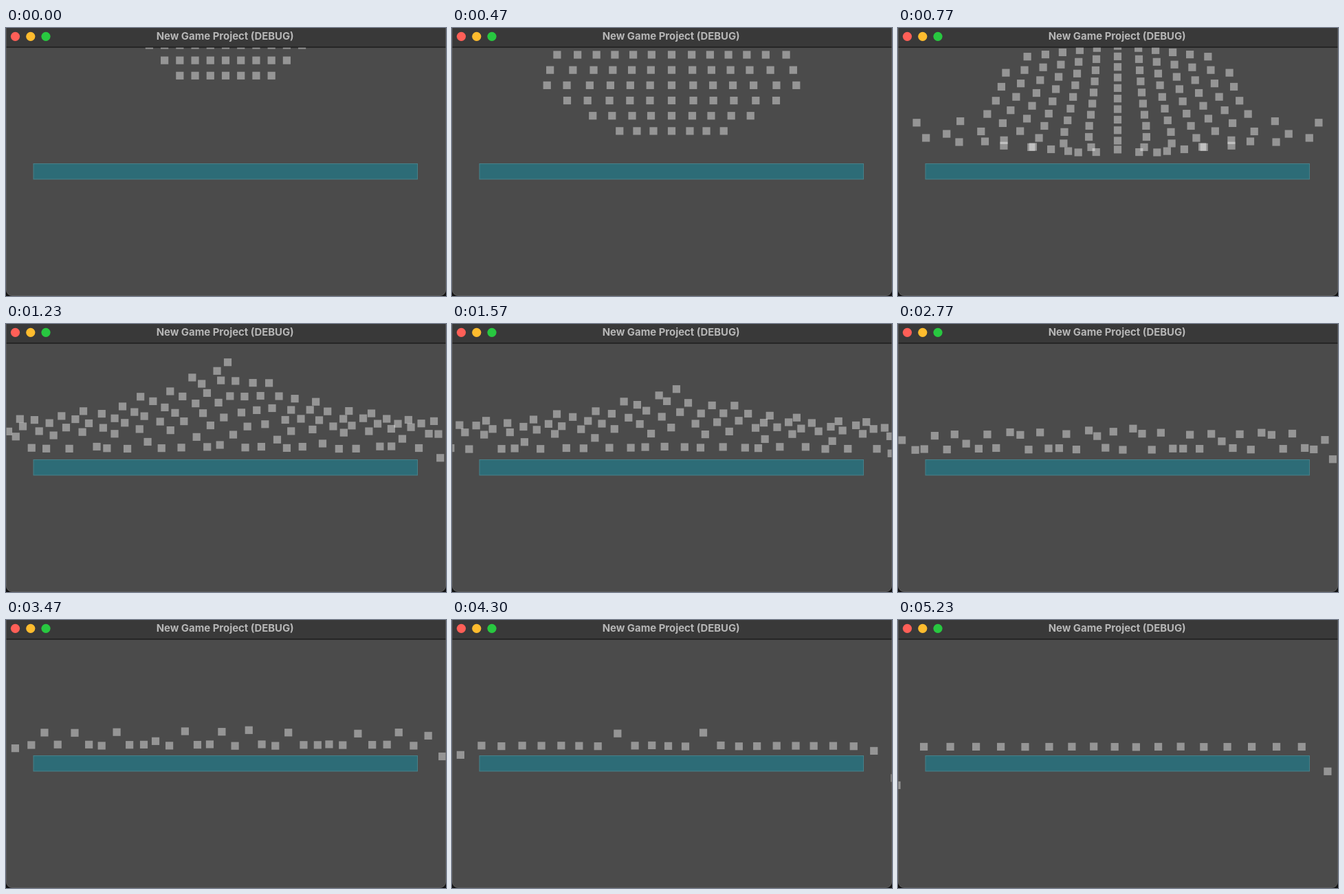
An HTML page that plays this animation: 640 by 390 pixels, repeating every 5270 ms.

```html
<!DOCTYPE html>
<html lang="en">
<head>
<meta charset="utf-8">
<title>Falling particles</title>
<style>
  html, body { margin: 0; width: 100%; height: 100%; overflow: hidden; background: #111; }
  svg { display: block; width: 640px; height: 390px; }
  text { font: 700 14.9px Inter, "Liberation Sans", sans-serif; fill: #b6b6b6; }
</style>
</head>
<body>
<svg viewBox="0 0 640 390">
  <defs>
    <clipPath id="window"><path d="M0 0H640V381a9 9 0 0 1 -9 9H9a9 9 0 0 1 -9 -9Z"/></clipPath>
    <clipPath id="view"><rect y="28.5" width="640" height="361.5"/></clipPath>
  </defs>
  <g clip-path="url(#window)">
    <rect width="640" height="390" fill="#4b4b4b"/>
    <rect width="640" height="28" fill="#393939"/>
    <rect y="27.5" width="640" height="1" fill="#0c0c0c"/>
    <circle cx="13.5" cy="12.3" r="6.6" fill="#ff5f57"/>
    <circle cx="35.8" cy="12.3" r="6.6" fill="#febc2e"/>
    <circle cx="58" cy="12.3" r="6.6" fill="#28c840"/>
    <text x="318.7" y="17.2" text-anchor="middle">New Game Project (DEBUG)</text>
    <rect x="40" y="197.5" width="558.5" height="22.5" fill="#2d6c77" stroke="#47818a"/>
    <g id="particles" clip-path="url(#view)" fill="#fff" fill-opacity=".41"></g>
  </g>
  <path d="M.5 0V381a8.5 8.5 0 0 0 8.5 8.5H631a8.5 8.5 0 0 0 8.5 -8.5V0" fill="none" stroke="#666" stroke-opacity=".6"/>
</svg>
<script>
const LOOP = 5.27, IMPACT = 0.77, SETTLE = 0.46;
const CELL = 22.22, SIZE = 11.2, CENTER = 319.5, GRAVITY = 545;
const layer = document.getElementById("particles");

const clamp = v => Math.max(0, Math.min(1, v));
const smooth = v => (v = clamp(v), v * v * (3 - 2 * v));
const mix = (a, b, u) => a + (b - a) * u;
const noise = n => { const v = Math.sin(n * 127.1 + 3.7) * 43758.5453; return v - Math.floor(v) - 0.5; };
const freeFall = (row, t) => -64 + row * CELL + 46 * t + GRAVITY / 2 * t * t;

// time, spacing, widening, pile height in the middle, at the sides, floor row
const keys = [
  [0.77, 2.9, 0.035, 150, 48, 180],
  [1.23, 4.1, 0.031, 132, 45, 180],
  [1.93, 8.2, 0.023, 55, 32, 180.5],
  [2.77, 13.5, 0.047, 32, 22, 181.5],
  [3.47, 19, 0.06, 24, 17, 182],
  [5.23, 30.8, 0.42, 20, 15, 184.5]
];

// Cubic interpolation through the keys
function pileAt(t) {
  const last = keys.length - 1;
  let j = 0;
  while (j < last - 1 && keys[j + 1][0] <= t) j++;
  const slope = (m, n) => {
    const a = keys[Math.max(0, m - 1)], b = keys[Math.min(last, m + 1)];
    return (b[n] - a[n]) / (b[0] - a[0]);
  };
  const p = keys[j], q = keys[j + 1], h = q[0] - p[0], u = (t - p[0]) / h;
  const w = u * u * (3 - 2 * u);
  const [, spacing, widening, middle, sides, floor] = p.map((v, n) =>
    mix(v, q[n], w) + h * u * (1 - u) * (slope(j, n) * (1 - u) - slope(j + 1, n) * u));
  return { spacing, widening, middle, sides, floor };
}

// Where a cell of the disc is squashed or thrown to on impact
function impact(row, col) {
  const side = Math.abs(col), depth = row + 4;
  const bottomRow = Math.min(6, 9 - side);
  const gap = 26.3 + 0.7 * depth + 0.13 * depth ** 2 - 2.1 * Math.max(0, row - 3) ** 2;
  const burst = 21.5 * Math.max(0, side - 2) * Math.exp(-(((bottomRow - row - 0.8) / 1.2) ** 2));
  const y = 88 + 6.6 * side + (15.2 + 0.85 * side) * row;
  const resting = 181 - 5 * Math.log(1 + Math.exp((181 - y) / 5));
  return {
    spread: col * gap + Math.sign(col) * Math.max(0, 4 - side) * 1.3,
    thrown: Math.sign(col) * burst,
    hitY: resting - burst * 0.35
  };
}

function makeParticles() {
  const list = [];
  for (let row = -6; row <= 6; row++) for (let col = -6; col <= 6; col++) {
    if (col * col + row * row < 49) list.push({ row, col, ...impact(row, col) });
  }
  list.sort((a, b) => a.spread + a.thrown - b.spread - b.thrown);

  // Interleave high and low particles inside each group of neighbours
  const groups = new Map();
  list.forEach((p, n) => {
    const g = Math.floor((n - 66) / 13);
    if (!groups.has(g)) groups.set(g, []);
    groups.get(g).push(p);
  });
  const ordered = [];
  for (const group of groups.values()) {
    group.sort((a, b) => b.hitY - a.hitY);
    group.forEach((_, k) => {
      const order = group.length === 13 ? k * 8 % 13 : 0;
      group[order].level = (order + 0.5) / 13;
      ordered.push(group[order]);
    });
  }
  ordered.forEach((p, n) => {
    p.rank = n - 72;
    p.node = document.createElementNS("http://www.w3.org/2000/svg", "rect");
    p.node.setAttribute("width", SIZE);
    p.node.setAttribute("height", SIZE);
    layer.append(p.node);
  });
  return ordered;
}

function falling(p, t) {
  const u = t / IMPACT;
  const squash = (freeFall(p.row, IMPACT) - p.hitY) * clamp((t - 0.45) / (IMPACT - 0.45)) ** 2;
  return {
    x: CENTER + mix(p.col * CELL, p.spread, u ** 1.5) + p.thrown * u ** 5,
    y: Math.min(181, freeFall(p.row, t) - squash)
  };
}

function offsetInPile(p, pile) {
  const skew = p.rank < 0 ? 1.27 : 1;
  return p.rank * (pile.spacing + pile.widening * skew * Math.abs(p.rank));
}

function spreading(p, t, pile, earlier) {
  const offset = offsetInPile(p, pile), reach = Math.abs(offset);
  const local = pile.spacing + 2 * pile.widening * Math.abs(p.rank);
  const onFloor = local / 30;
  const lift = (p.level - onFloor) / Math.max(0.05, 1 - onFloor);
  const top = mix(pile.sides, pile.middle, clamp(1 - reach / 320) ** 2.4);
  const loose = clamp(1.25 - onFloor);
  const height = 18 * smooth(lift * 6 + 0.35) + (top - 18) * Math.max(0, lift);

  // Past the end of the platform gravity takes over
  const speed = Math.max(40, (reach - Math.abs(offsetInPile(p, earlier))) / 0.05);
  const drop = GRAVITY / 2 * (Math.max(0, reach - 281) / speed) ** 2;
  return {
    x: 316 + offset + noise(p.rank + 200) * 8 * loose,
    y: pile.floor - height + noise(p.rank + 500) * 4 * loose + drop
  };
}

const particles = makeParticles();

function draw(t) {
  const landed = t > IMPACT;
  const pile = landed && pileAt(t), earlier = landed && pileAt(t - 0.05);
  const blend = 1 - (1 - clamp((t - IMPACT) / SETTLE)) ** 2;
  for (const p of particles) {
    let { x, y } = falling(p, Math.min(t, IMPACT));
    if (landed) {
      const s = spreading(p, t, pile, earlier);
      x = mix(x, s.x, blend);
      y = mix(y, s.y, blend);
    }
    p.node.setAttribute("x", (x - SIZE / 2).toFixed(2));
    p.node.setAttribute("y", (y - SIZE / 2).toFixed(2));
  }
}

const start = performance.now();
function tick() {
  const t = (performance.now() - start) / 1000 % LOOP;
  draw(Math.floor(t * 30) / 30);
  requestAnimationFrame(tick);
}
tick();
</script>
</body>
</html>
```
